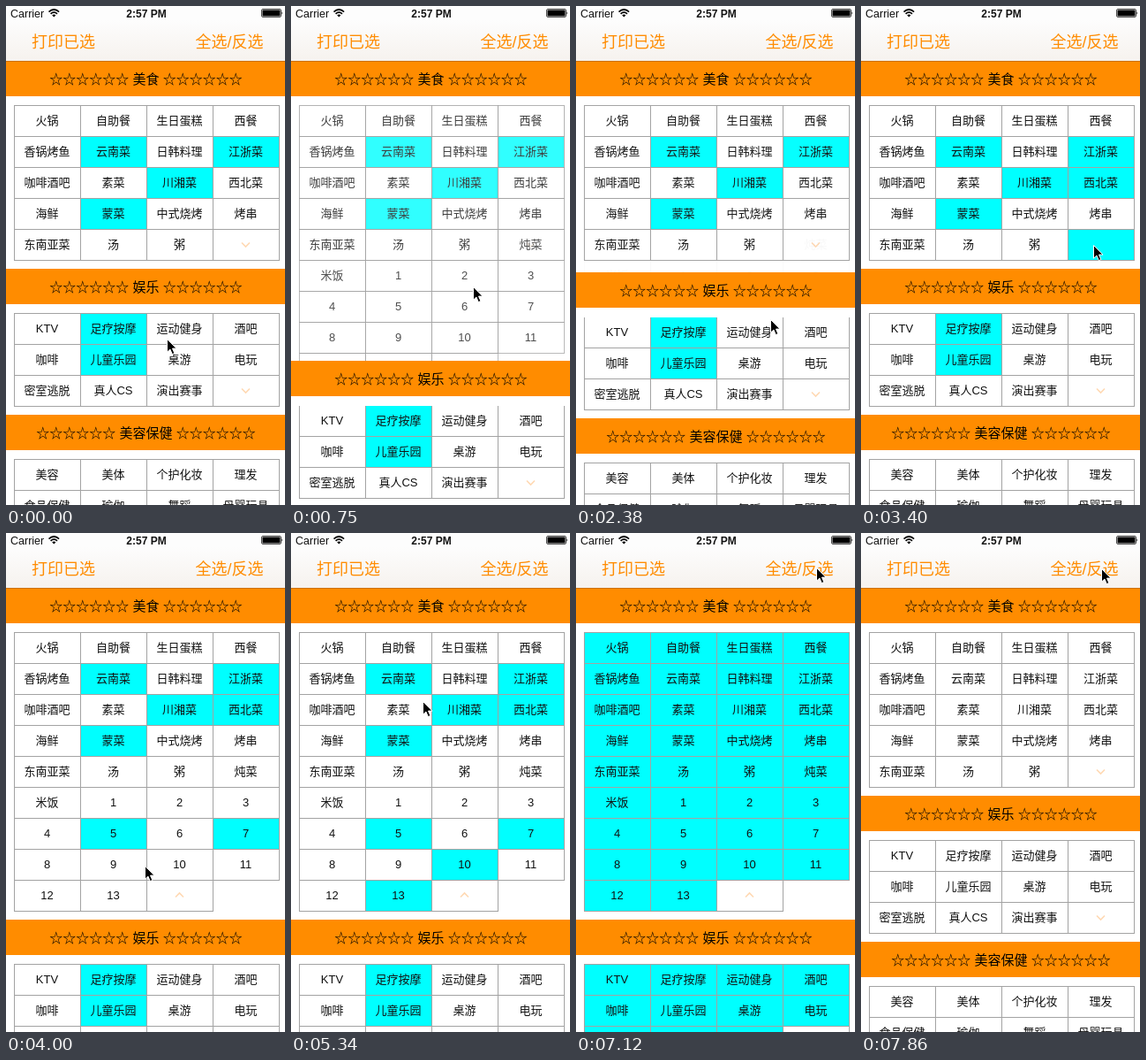
Animation, 316 px wide and 564 px high, one loop 8000 ms. Source, as an HTML page:

```html
<!DOCTYPE html>
<html lang="zh-CN">
<head>
<meta charset="utf-8">
<style>
  html, body { margin: 0; width: 100%; height: 100%; overflow: hidden; background: #fff; }
  svg { display: block; width: 316px; height: 564px; }
  text { font-family: "Liberation Sans", "Noto Sans CJK SC", "Noto Sans CJK", sans-serif; text-anchor: middle; fill: #111; }
  .cell { font-size: 13px; }
  .head { font-size: 15px; fill: #000; }
  .nav { font-size: 18px; font-weight: 300; fill: #ff8c00; }
</style>
</head>
<body>
<svg viewBox="0 0 316 564" xmlns="http://www.w3.org/2000/svg">
  <defs>
    <linearGradient id="bar" x2="0" y2="1">
      <stop offset=".25" stop-color="#fdfdfd"/>
      <stop offset="1" stop-color="#f6f2ee"/>
    </linearGradient>
  </defs>
  <rect width="316" height="564" fill="#fff"/>
  <g id="list"></g>
  <rect width="316" height="62" fill="url(#bar)"/>
  <text x="5" y="12.5" style="font-size:12.5px;text-anchor:start">Carrier</text>
  <g fill="none" stroke="#000" stroke-width="1.7">
    <path d="M48.5 6.6Q54.3 1.4 60.1 6.6M50.6 8.9Q54.3 5.5 58 8.9"/>
    <path d="M52.2 10.4Q54.3 8.6 56.4 10.4L54.3 12.6Z" fill="#000" stroke="none"/>
  </g>
  <text x="159" y="12.5" style="font-size:12px;font-weight:bold">2:57 PM</text>
  <rect x="289.5" y="3.5" width="22" height="9" rx="1.5" fill="none" stroke="#000" stroke-width=".7"/>
  <rect x="290.5" y="4.5" width="20" height="7" rx=".6"/>
  <path d="M312.5 6.2q1.8 1.8 0 3.6z"/>
  <text class="nav" x="65" y="46.5">打印已选</text>
  <text class="nav" x="253" y="46.5">全选/反选</text>
  <path id="cursor" d="M.5 .5V15.2L3.9 12L6.3 17.6L8.9 16.5L6.5 11.1H11Z" fill="#000" stroke="#fff"/>
</svg>
<script>
const LOOP = 8000, COL = 75, ROW = 35, LEFT = 9;

// The screen refreshes every 150 ms, with a few ticks of 140 ms.
const shortTicks = new Set([11, 14, 17, 19, 21, 27, 37, 42, 50, 53]);
const ticks = [0];
for (let i = 0; i < 53; i++) ticks.push(ticks[i] + (shortTicks.has(i) ? 140 : 150));

const food = ('火锅 自助餐 生日蛋糕 西餐 香锅烤鱼 云南菜 日韩料理 江浙菜 咖啡酒吧 素菜 川湘菜 西北菜 ' +
  '海鲜 蒙菜 中式烧烤 烤串 东南亚菜 汤 粥 炖菜 米饭 1 2 3 4 5 6 7 8 9 10 11 12 13').split(' ');
const fun = 'KTV 足疗按摩 运动健身 酒吧 咖啡 儿童乐园 桌游 电玩 密室逃脱 真人CS 演出赛事'.split(' ');
const beauty = '美容 美体 个护化妆 理发 食品保健 瑜伽 舞蹈 母婴玩具'.split(' ');
const FOLDED = 19;

const initial = ['云南菜', '江浙菜', '川湘菜', '蒙菜', '足疗按摩', '儿童乐园'];
const taps = [[1200, '5'], [1500, '7'], [2820, '西北菜'], [4140, '13'], [4440, '10'], [5630, '云南菜']];
const SELECT_ALL = 6820, CLEAR = 7710;
const presses = [[450, 600], [2090, 2230], [3400, 3550]];

const pointer = [
  [0, 182, 376], [450, 270, 270], [600, 262, 276], [750, 206, 317], [1050, 132, 336],
  [1200, 124, 338], [1500, 266, 338], [1940, 202, 408], [2230, 203, 407], [2820, 268, 200],
  [2970, 268, 202], [3400, 263, 270], [3550, 262, 272], [4140, 124, 408], [4440, 196, 380],
  [4590, 200, 377], [5340, 149, 190], [5630, 128, 164], [5780, 129, 165], [6670, 261, 38],
  [6970, 261, 38], [7120, 272, 39], [7560, 272, 39], [7710, 272, 40]
];

const list = document.getElementById('list');
const cursor = document.getElementById('cursor');

function ease(t, start) {
  const x = Math.min(1, Math.max(0, (t - start) / 300));
  return x * x * (3 - 2 * x);
}

function openness(t) {
  return t >= CLEAR ? 0 : ease(t, 550) - ease(t, 2110) + ease(t, 3470);
}

function selection(t) {
  if (t >= CLEAR) return new Set();
  if (t >= SELECT_ALL) return new Set([...food, ...fun, ...beauty]);
  const chosen = new Set(initial);
  for (const [at, name] of taps) {
    if (t >= at && !chosen.delete(name)) chosen.add(name);
  }
  return chosen;
}

function pointerAt(t) {
  const n = pointer.findIndex(key => key[0] > t);
  if (n < 0) return pointer[pointer.length - 1].slice(1);
  const [a, b] = [pointer[n - 1], pointer[n]];
  const f = (t - a[0]) / (b[0] - a[0]);
  return [1, 2].map(k => Math.round(a[k] + (b[k] - a[k]) * f));
}

function cell(index, top, content, lit, opacity = 1) {
  const x = LEFT + index % 4 * COL, y = top + Math.floor(index / 4) * ROW;
  return `<g opacity="${opacity}"><rect x="${x + .5}" y="${y + .5}" width="${COL}" height="${ROW}"
    fill="${lit ? '#0ff' : 'none'}" stroke="#a3a3a3"/>${content(x + COL / 2, y + ROW / 2)}</g>`;
}

const label = name => (x, y) => `<text class="cell" x="${x}" y="${y + 4.7}">${name}</text>`;
const blank = () => '';
const chevron = dir => (x, y) =>
  `<path d="M${x - 4.5} ${y - 2 * dir}l4.5 ${4.5 * dir}l4.5 ${-4.5 * dir}" fill="none" stroke="#ffd9b3" stroke-width="1.6"/>`;

function header(title, y) {
  const stars = '☆'.repeat(6);
  return `<rect y="${y}" width="316" height="40" fill="#ff8c00"/>
    <text class="head" x="158.5" y="${y + 25.7}">${stars} ${title} ${stars}</text>`;
}

function cells(names, top, chosen, opacity = 1, from = 0) {
  // Highlighted cells go first so that every border stays visible.
  const order = names.map((name, i) => [name, i + from]);
  order.sort((a, b) => chosen.has(b[0]) - chosen.has(a[0]));
  return order.map(([name, i]) => cell(i, top, label(name), chosen.has(name), opacity)).join('');
}

function render(t) {
  const p = openness(t), chosen = selection(t);
  const pressed = presses.some(([a, b]) => t >= a && t < b);
  const shift = Math.round(140 * p), funTop = 297 + shift, beautyTop = 462 + shift;
  const moving = p > 0 && p < 1;

  let out = header('美食', 62) + '<rect y="62" width="316" height="1" opacity=".2"/>';
  out += cells(food.slice(0, FOLDED), 112, chosen, 1 - p * (1 - p));
  if (p < 1) out += cell(FOLDED, 112, pressed ? blank : chevron(1), pressed, 1 - p);
  if (p > 0) {
    out += cells(food.slice(FOLDED), 112, chosen, p, FOLDED);
    out += cell(food.length, 112, pressed ? blank : chevron(-1), pressed, p);
  }

  out += `<rect y="${funTop}" width="316" height="300" fill="#fff"/>` + header('娱乐', funTop);
  out += cells(fun, funTop + 50, chosen) + cell(fun.length, funTop + 50, chevron(1), false);
  if (moving) out += `<rect y="${funTop + 50}" width="316" height="1" fill="#fff"/>`;
  out += header('美容保健', beautyTop) + cells(beauty, beautyTop + 50, chosen);

  list.innerHTML = out;
  cursor.setAttribute('transform', `translate(${pointerAt(t)})`);
}

const began = performance.now();
let shown = -1;
function tick() {
  const t = (performance.now() - began) % LOOP;
  const now = ticks.filter(start => start <= t).pop();
  if (now !== shown) render(shown = now);
  requestAnimationFrame(tick);
}
tick();
</script>
</body>
</html>
```
